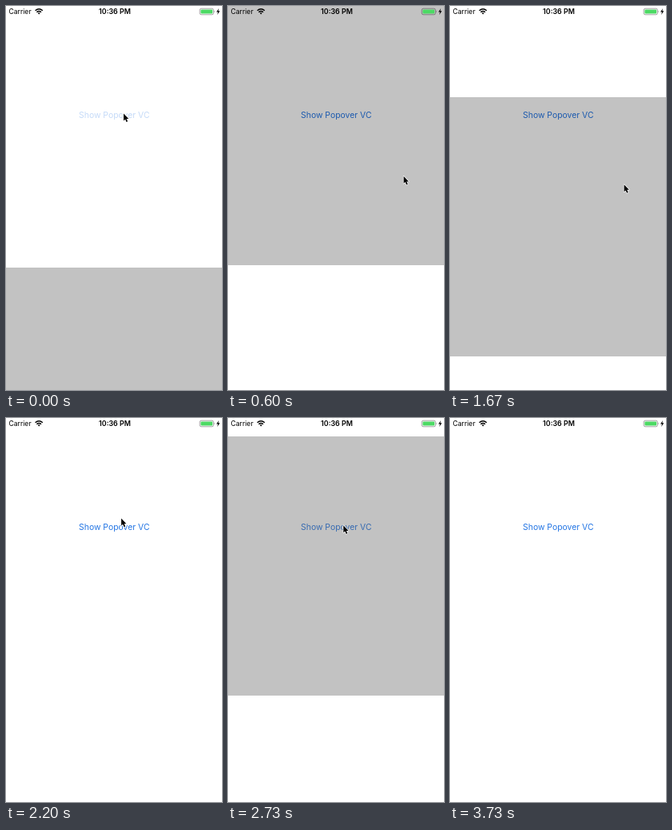
Animation, 270 px wide and 480 px high, one loop 3990 ms. Source, as an HTML page:

```html
<!DOCTYPE html>
<html lang="en">
<head>
<meta charset="utf-8">
<title>Popover demo</title>
<style>
  html, body { margin: 0; width: 100%; height: 100%; overflow: hidden; background: #fff; }
  body { position: relative; font-family: Inter, "Open Sans", sans-serif; }
  #button, #sheet, svg, .label { position: absolute; left: 0; top: 0; }
  #button {
    top: 127px; width: 270.6px; line-height: 20px; text-align: center;
    font-size: 10.4px; color: #2576e4;
  }
  #sheet {
    width: 270px; height: 480px;
    background: linear-gradient(rgba(0, 0, 0, .24) 324px, #fff 324px);
  }
  .label { line-height: 14px; color: #000; white-space: nowrap; }
  #carrier { left: 3.5px; font-size: 8.6px; }
  #clock { width: 272px; text-align: center; font-size: 8.9px; font-weight: 600; }
</style>
</head>
<body>
<div id="button">Show Popover VC</div>
<div id="sheet"></div>
<div class="label" id="carrier">Carrier</div>
<div class="label" id="clock">10:36 PM</div>
<svg width="270" height="480" viewBox="0 0 270 480">
  <g fill="none" stroke="#000" stroke-width="1.5">
    <path d="M36.6 5.8Q41.2 1.6 45.8 5.8"/>
    <path d="M38.4 7.7Q41.2 5.2 44 7.7"/>
  </g>
  <path d="M39.7 8.8Q41.2 7.6 42.7 8.8L41.2 10.4Z"/>
  <rect x="242.2" y="3.2" width="17.2" height="7.6" rx="2" fill="none" stroke="#000" stroke-opacity=".45" stroke-width=".8"/>
  <rect x="243.4" y="4.4" width="14.8" height="5.2" rx="1" fill="#4cd964"/>
  <path d="M260.4 5.6Q261.6 7 260.4 8.4Z" opacity=".45"/>
  <path d="M266.1 3L263 7.6H265L264.2 11L267.3 6.3H265.3Z"/>
  <path id="cursor" d="M.3 .8V9.8L2.3 8L3.8 11.4L5.4 10.7L3.9 7.4H6.6Z" stroke="#fff" stroke-width="1.4" stroke-linejoin="round" paint-order="stroke"/>
</svg>
<script>
  const LOOP = 3990, HEIGHT = 480, SETTLE = 500, OMEGA = Math.sqrt(1000 / 3);
  const [button, sheet, cursor] = ["button", "sheet", "cursor"].map(id => document.getElementById(id));

  // Presentation and dismissal start times
  const moves = [
    { at: -63, open: true },
    { at: 1619.2, open: false },
    { at: 2467, open: true },
    { at: 3227.6, open: false }
  ];

  // Pointer stops: time, x, y
  const stops = [
    [0, 146.7, 133.6], [130, 146.7, 133.6], [530, 219.3, 212],
    [870, 219.3, 212], [1000, 220, 225], [1130, 217.3, 222.4],
    [1670, 217.3, 222.4], [2130, 144, 122], [2200, 143.8, 124.8],
    [2330, 144, 133.5], [2730, 144, 133.5], [3130, 175.7, 184],
    [3330, 175.7, 184], [3670, 282, 240], [LOOP, 282, 240]
  ];

  const clamp = v => Math.min(1, Math.max(0, v));
  const smooth = v => v * v * (3 - 2 * v);

  // Critically damped spring, from 1 to 0
  function spring(ms) {
    if (ms >= SETTLE) return 0;
    const x = OMEGA * ms / 1000;
    return (1 + x) * Math.exp(-x);
  }

  const lastMove = t => moves.findLast(m => m.at <= t);

  function sheetTop(t) {
    const { at, open } = lastMove(t);
    const rest = spring(t - at);
    return Math.round(HEIGHT * (open ? rest : 1 - rest));
  }

  function buttonAlpha(t) {
    const { at, open } = lastMove(t);
    if (open) return 0.2 + 0.8 * smooth(clamp((t - at) / 370));
    return t >= 2390 && t < 2467 ? 0.2 : 1;
  }

  function pointer(t) {
    const i = stops.findIndex(s => s[0] > t);
    const [t0, x0, y0] = stops[i - 1], [t1, x1, y1] = stops[i];
    const k = smooth((t - t0) / (t1 - t0));
    return [x0 + (x1 - x0) * k, y0 + (y1 - y0) * k];
  }

  const tick = k => Math.round(k * 20 / 3) * 10;
  function hold(t) {
    const k = Math.round(t * 3 / 200);
    return tick(tick(k) > t ? k - 1 : k);
  }

  function draw(now) {
    const t = hold(now % LOOP);
    sheet.style.transform = `translateY(${sheetTop(t)}px)`;
    button.style.opacity = buttonAlpha(t);
    cursor.setAttribute("transform", `translate(${pointer(t)})`);
  }

  const start = performance.now();
  function frame() {
    draw(performance.now() - start);
    requestAnimationFrame(frame);
  }
  frame();
</script>
</body>
</html>
```
